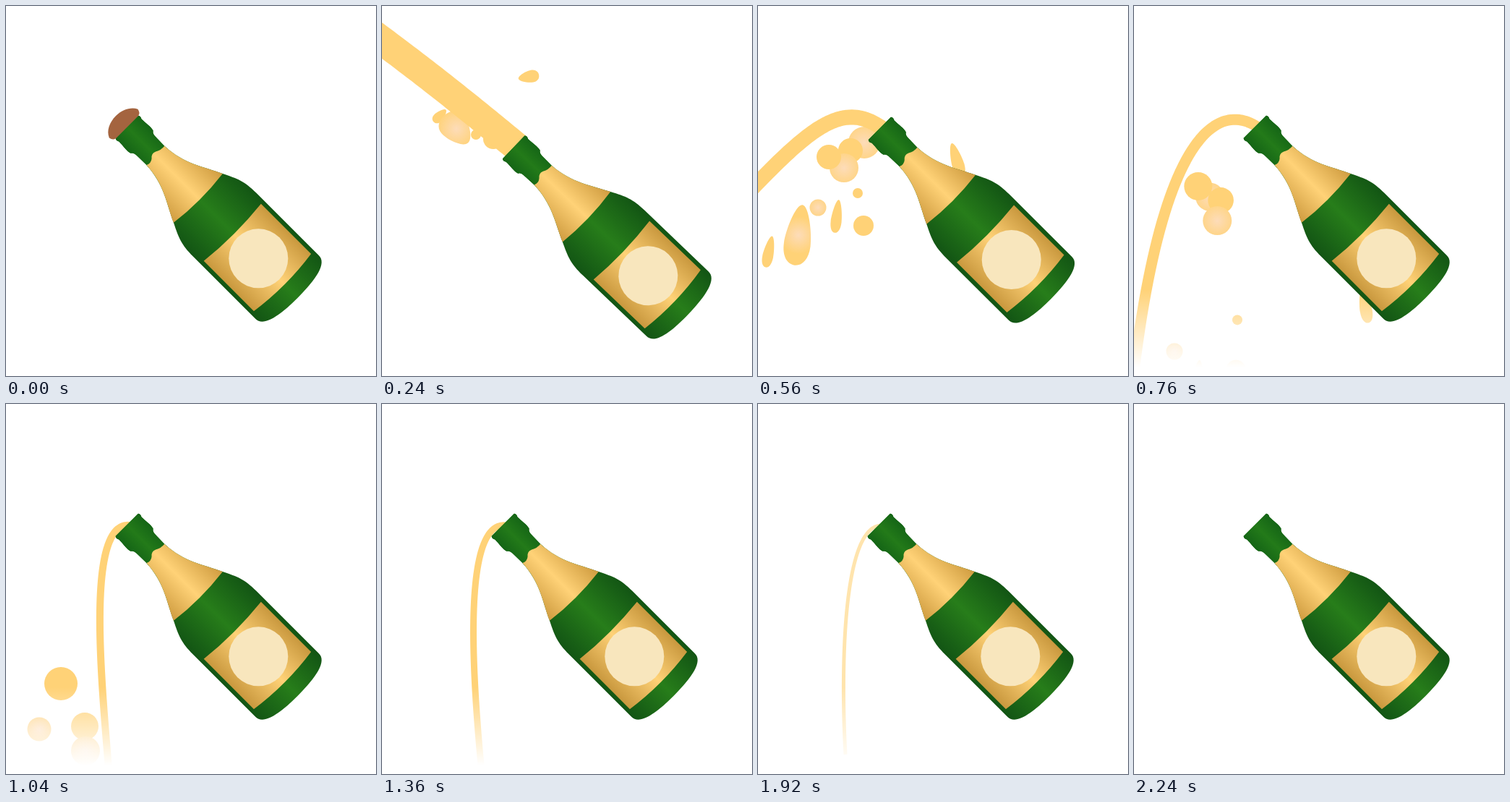
These frames come from a looping animation (512 by 512 pixels, 2.4 s). An HTML page with a canvas:

```html
<!DOCTYPE html>
<html lang="en">
<head>
<meta charset="utf-8">
<title>Champagne</title>
<style>
  html, body { margin: 0; width: 100%; height: 100%; overflow: hidden; background: #fff; }
  canvas { display: block; width: 100vw; height: 100vh; }
</style>
</head>
<body>
<canvas id="stage" width="512" height="512"></canvas>
<script>
const ctx = document.getElementById('stage').getContext('2d');
const LOOP = 2400, STEP = 40, CENTER = 348;
const GOLD = '#ffd277';

// Bottle parts, upright; the axis is x = 0 and the whole is turned by -45 degrees.
const glass = new Path2D(`M-22 236.5H22Q24.5 239 22 243C22 252 24 260 22 266Q18.5 268 18.5 273
  L18 292C20 330 36 350 48 376C58 396 62 405 62 428V550C62.5 566 36 571 0 571
  C-36 571 -62.5 566 -62 550V428C-62 405 -58 396 -48 376C-36 350 -20 330 -18 292
  L-18.5 273Q-18.5 268 -22 266C-24 260 -22 252 -22 243Q-24.5 239 -22 236.5Z`);
const collar = new Path2D(`M-18 293Q-12 296 -7 292Q-2 286 4 289Q11 293 18 292
  C20 330 36 350 48 376Q0 382 -48 376C-36 350 -20 330 -18 293Z`);
const label = new Path2D('M-56 443Q0 449 56 443V541Q0 549 -56 541Z');
const cork = new Path2D(`M-22 237H22Q27 236 28 230C24 221 12 215 0 215
  C-12 215 -24 220 -28 230Q-27 236 -22 237Z`);

// Time, two control points, end point, width, opacity.
const jetKeys = [
  [240, 120, 140, 60, 92, -20, 33, 40, 1],
  [560, 118, 130, 75, 165, -20, 265, 21, 1],
  [640, 118, 130, 58, 168, -25, 345, 18, 1],
  [760, 115, 130, 40, 180, 0, 505, 15, 1],
  [1040, 110, 160, 132, 380, 142, 505, 10, 1],
  [1360, 111, 160, 125, 370, 137, 500, 9, 1],
  [1920, 115, 165, 115, 380, 121, 485, 5, .6],
  [2240, 115, 165, 115, 380, 120, 480, 3, 0]
];

// Each drop passes a at time ta and b at time tb, with pull g.
const drops = [
  { born: 150, ta: 240, a: [203, 98], tb: 560, b: [275, 213], g: .00125, r: 8.5, len: 24 },
  { born: 170, ta: 240, a: [80, 152], tb: 560, b: [15, 340], g: .0012, r: 7.5, len: 22 },
  { born: 160, ta: 240, a: [103, 170], tb: 560, b: [56, 317], g: .002, r: 20, r2: 18.5, len: 42, shiny: true },
  { born: 280, ta: 300, a: [135, 170], tb: 560, b: [109, 291], g: .0014, r: 7.5, len: 23 },
  { born: 160, ta: 240, a: [154, 184], tb: 560, b: [146, 304], g: .0012, r: 14 },
  { born: 160, ta: 240, a: [130, 178], tb: 560, b: [138, 259], g: .0012, r: 7 },
  { born: 320, ta: 360, a: [110, 200], tb: 560, b: [83, 279], g: .0015, r: 11.5, shiny: true },
  { born: 400, ta: 560, a: [147, 189], tb: 1040, b: [46, 450], g: .0006, r: 22, r2: 16.5, shiny: true },
  { born: 400, ta: 560, a: [128, 200], tb: 1040, b: [109, 446], g: .0006, r: 17, r2: 19 },
  { born: 400, ta: 560, a: [119, 224], tb: 1040, b: [110, 480], g: .0006, r: 20, shiny: true },
  { born: 400, ta: 560, a: [98, 209], tb: 1040, b: [76, 387], g: .0006, r: 17, r2: 23 }
];

const mix = (a, b, p) => a + (b - a) * p;
const clamp = v => Math.min(1, Math.max(0, v));

function across(half, edge, middle) {
  const g = ctx.createLinearGradient(-half, 0, half, 0);
  g.addColorStop(0, edge);
  g.addColorStop(.5, middle);
  g.addColorStop(1, edge);
  return g;
}

const green = across(63, '#125414', '#277d1a');
const neckGreen = across(24, '#146416', '#237a19');
const collarGold = across(48, '#cf9c40', GOLD);
const labelGold = across(58, '#c7963c', GOLD);
const fade = ctx.createLinearGradient(0, 392, 0, 500);
fade.addColorStop(0, 'rgba(255,255,255,0)');
fade.addColorStop(1, '#fff');

function recoil(t) {
  return t < 180 ? Math.sin(t / 180 * Math.PI / 2) : (1 - clamp((t - 180) / 500)) ** 2;
}

function fill(path, style) {
  ctx.fillStyle = style;
  ctx.fill(path);
}

function glow(r) {
  const g = ctx.createRadialGradient(0, 0, 0, 0, 0, r * 1.4);
  g.addColorStop(0, '#fddcb9');
  g.addColorStop(1, GOLD);
  return g;
}

function drawDrop(d, t) {
  if (t < d.born) return;
  const p = (t - d.ta) / (d.tb - d.ta);
  const x = mix(d.a[0], d.b[0], p);
  const y = mix(d.a[1], d.b[1], p) + d.g * (t - d.ta) * (t - d.tb);
  const vx = (d.b[0] - d.a[0]) / (d.tb - d.ta);
  const vy = (d.b[1] - d.a[1]) / (d.tb - d.ta) + d.g * (2 * t - d.ta - d.tb);
  const r = mix(d.r, d.r2 || d.r, clamp(p));
  const size = clamp((t - d.born + 20) / 100);
  ctx.save();
  ctx.translate(x, y);
  ctx.scale(size, size);
  ctx.fillStyle = d.shiny ? glow(r) : GOLD;
  ctx.beginPath();
  if (d.len) {
    const h = d.len * mix(.6, 1, clamp(p));
    ctx.rotate(Math.atan2(vy, vx) - Math.PI / 2);
    ctx.moveTo(0, -h);
    ctx.bezierCurveTo(r * .5, -h, r, -h * .1, r, h * .32);
    ctx.bezierCurveTo(r, h * .77, r * .55, h, 0, h);
    ctx.bezierCurveTo(-r * .55, h, -r, h * .77, -r, h * .32);
    ctx.bezierCurveTo(-r, -h * .1, -r * .5, -h, 0, -h);
  } else {
    ctx.arc(0, 0, r, 0, 7);
  }
  ctx.fill();
  ctx.restore();
}

function jetAt(t) {
  const i = jetKeys.findIndex(k => k[0] > t);
  if (i === 0) return jetKeys[0];
  if (i < 0) return jetKeys[jetKeys.length - 1];
  const from = jetKeys[i - 1], to = jetKeys[i];
  const p = (t - from[0]) / (to[0] - from[0]);
  return from.map((v, n) => mix(v, to[n], p));
}

function drawJet(t, k) {
  const reach = clamp(t / 200);
  const [, ax, ay, bx, by, ex, ey, width, alpha] = jetAt(t);
  if (!reach || !alpha) return;
  const sx = 172 + 20 * k, sy = 168 + 36 * k;
  const curve = (s, a, b, c, u) =>
    (1 - u) ** 3 * s + 3 * u * (1 - u) ** 2 * a + 3 * u * u * (1 - u) * b + u ** 3 * c;
  ctx.beginPath();
  for (let i = 0; i <= 48; i++) {
    const u = i / 48 * reach;
    ctx.lineTo(curve(sx, ax, bx, ex, u), curve(sy, ay, by, ey, u));
  }
  ctx.globalAlpha = alpha;
  ctx.strokeStyle = GOLD;
  ctx.lineWidth = width;
  ctx.lineJoin = 'round';
  ctx.stroke();
  ctx.globalAlpha = 1;
}

function drawCork(t) {
  if (t > 240) return;
  ctx.save();
  ctx.rotate(-Math.PI / 4);
  ctx.translate(0, 227 - 1.6 * t);
  ctx.rotate(t * .008);
  ctx.translate(0, -227);
  fill(cork, '#a4643f');
  ctx.restore();
}

function drawBottle(k) {
  ctx.save();
  ctx.translate(CENTER + 24.5 * k, CENTER + 31 * k);
  ctx.rotate(-.029 * k);
  ctx.translate(-CENTER, -CENTER);
  ctx.rotate(-Math.PI / 4);
  fill(glass, green);
  ctx.save();
  ctx.beginPath();
  ctx.rect(-30, 230, 60, 68);
  ctx.clip();
  fill(glass, neckGreen);
  ctx.restore();
  fill(collar, collarGold);
  fill(label, labelGold);
  ctx.fillStyle = '#f8e6bd';
  ctx.beginPath();
  ctx.arc(0, 494, 41, 0, 7);
  ctx.fill();
  ctx.restore();
}

function draw(now) {
  const t = Math.floor(now % LOOP / STEP) * STEP;
  const k = recoil(t);
  ctx.fillStyle = '#fff';
  ctx.fillRect(0, 0, 512, 512);
  drops.forEach(d => drawDrop(d, t));
  drawJet(t, k);
  ctx.fillStyle = fade;
  ctx.fillRect(0, 392, 512, 120);
  drawBottle(k);
  drawCork(t);
}

const start = performance.now();
function tick() {
  draw(performance.now() - start);
  requestAnimationFrame(tick);
}
tick();
</script>
</body>
</html>
```
